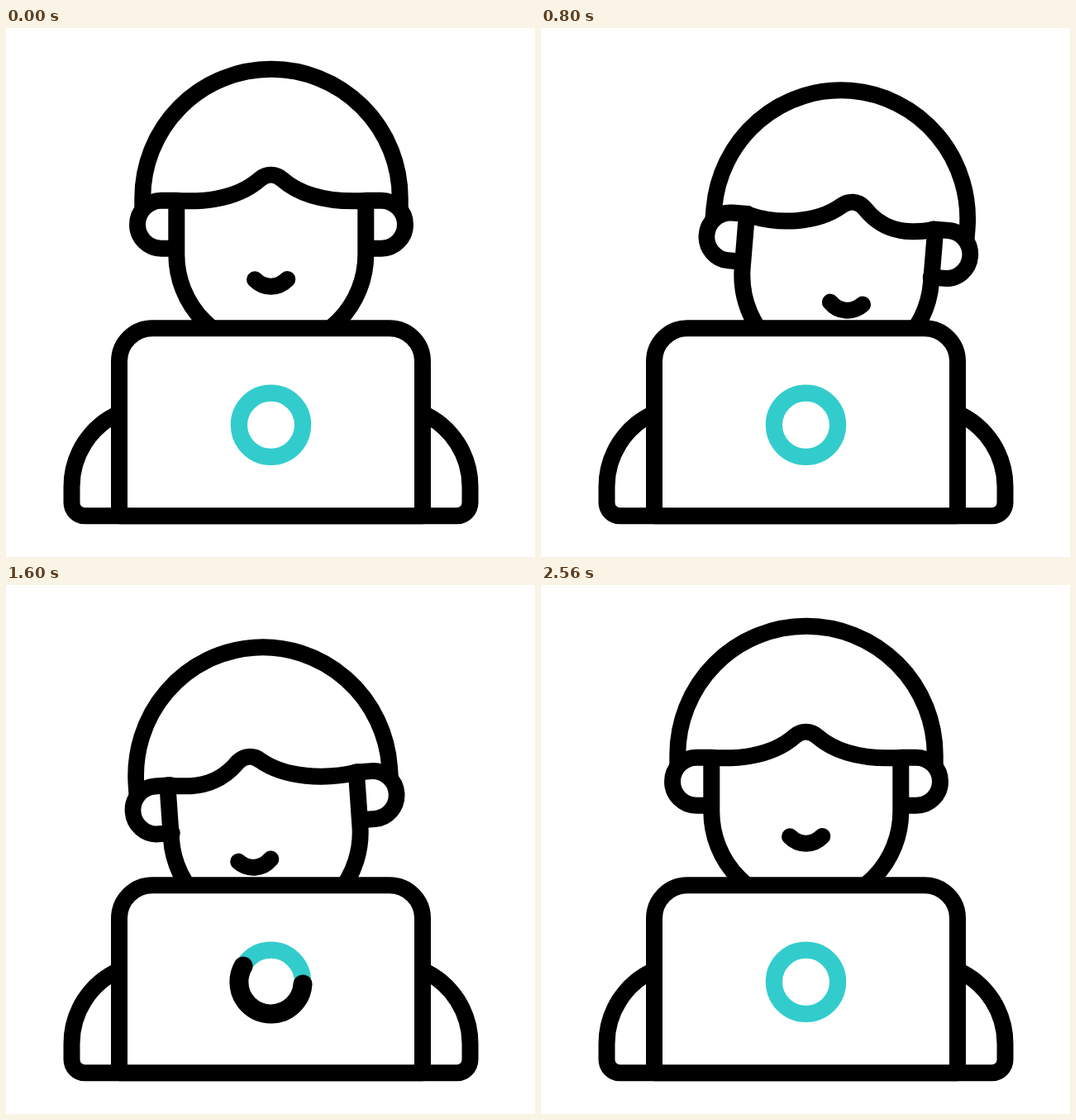
Write an HTML page that moves like this. It is 640 by 640 pixels and loops after 3.16 s.

```html
<!DOCTYPE html>
<html lang="en">
<head>
<meta charset="utf-8">
<title>Working at a laptop</title>
<style>
  html, body { margin: 0; width: 100%; height: 100%; overflow: hidden; background: #fff; }
  svg { display: block; width: 100%; height: 100%; }
</style>
</head>
<body>
<svg viewBox="0 0 640 640" fill="none" stroke="#000" stroke-width="20" stroke-linecap="round" stroke-linejoin="round">
  <g id="head">
    <g id="skull">
      <path d="M165.3 217V205.5A155.7 155.7 0 0 1 476.7 205.5V217"/>
      <path d="M207 208.8H188a29 29 0 0 0 0 58H205M435 208.8H454a29 29 0 0 1 0 58H437"/>
    </g>
    <path id="jaw" d="M206.3 209V274a114.5 114.5 0 0 0 229 0V209"/>
    <path id="fringe"/>
    <path id="mouth" d="M301 304.3C312 315.6 329 315.6 340.3 304"/>
  </g>
  <path d="M137 466A97.5 97.5 0 0 0 79.5 555V574.3a16 16 0 0 0 16 16H545.5a16 16 0 0 0 16 -16V555A97.5 97.5 0 0 0 504 466"/>
  <path fill="#fff" d="M137 590.3V403.3a40 40 0 0 1 40 -40H464a40 40 0 0 1 40 40V590.3Z"/>
  <circle cx="320.5" cy="480.3" r="38.6" stroke="#3cc" stroke-width="20.3"/>
  <circle id="arc" cx="320.5" cy="480.3" r="38.6" stroke-width="23" pathLength="360"/>
</svg>
<script>
const LOOP = 3160, STEP = 40;
const el = id => document.getElementById(id);
const [head, skull, jaw, fringe, mouth, arc] = ['head', 'skull', 'jaw', 'fringe', 'mouth', 'arc'].map(el);

function ease(t, from, to) {
  const x = Math.min(1, Math.max(0, (t - from) / (to - from)));
  return x * x * (3 - 2 * x);
}

// The ends stay at the temples while the parting slides by (dx, dy).
function fringePath(dx, dy) {
  const sag = dy * 1.3;
  return `M207 209C245 ${211 + sag} ${282 + dx * 0.8} ${205 + sag} ${307 + dx} ${183 + dy}` +
    `C${315 + dx} ${176 + dy} ${326 + dx} ${176 + dy} ${334 + dx} ${183 + dy}` +
    `C${359 + dx * 0.8} ${205 + sag} 396 ${211 + sag} 435 209`;
}

function draw(t) {
  const lean = ease(t, 0, 480);
  const look = ease(t, 460, 800);
  const swing = ease(t, 1200, 1600);
  const slide = ease(t, 1200, 1510);
  const back = ease(t, 2080, 2560);

  const x = 41.5 * lean - 51.7 * slide + 10.2 * back;
  const y = 25.5 * (lean - back);
  const tilt = 4.7 * lean - 8.7 * swing + 4 * back;
  const turn = 14 * look - 29 * swing + 15 * back;
  const depth = look - back;

  head.setAttribute('transform', `translate(${x} ${y}) rotate(${tilt} 321 205.5)`);
  skull.setAttribute('transform', `translate(321 0) scale(${1 - 0.013 * depth} 1) translate(-321 0)`);
  jaw.setAttribute('transform', `translate(${turn * 0.08} 0)`);
  fringe.setAttribute('d', fringePath(turn, 5 * depth + 0.1 * turn));
  mouth.setAttribute('transform', `translate(${turn * 1.12} ${2.5 * depth})`);

  const end = 360 * ease(t, 1200, 1920);
  const start = 360 * ease(t, 1560, 2210);
  const len = end - start;
  arc.setAttribute('visibility', len > 0.01 ? 'visible' : 'hidden');
  arc.setAttribute('stroke-dasharray', `${len} 400`);
  arc.setAttribute('stroke-dashoffset', -start);
}

const begin = performance.now();
function tick() {
  const t = (performance.now() - begin) % LOOP;
  draw(Math.floor(t / STEP) * STEP);
  requestAnimationFrame(tick);
}
tick();
</script>
</body>
</html>
```
